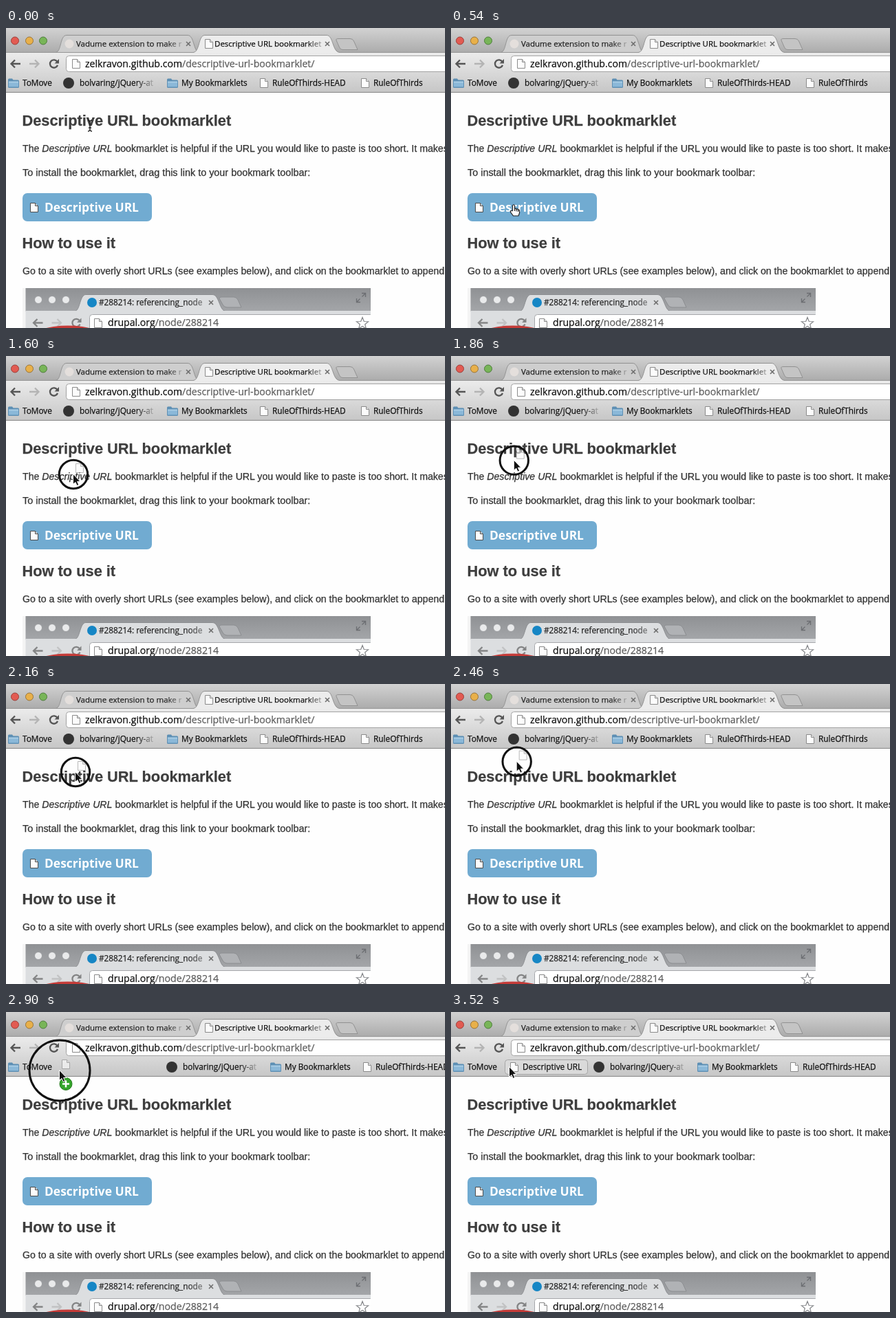
Recreate the animation shown at these times as an HTML page. Size 638 by 436 pixels, loop 5140 ms.

```html
<!DOCTYPE html>
<html lang="en">
<head>
<meta charset="utf-8">
<title>Bookmarklet install</title>
<style>
html, body { margin: 0; width: 100%; height: 100%; overflow: hidden; background: #fefefe; }
svg { display: block; width: 638px; height: 436px; }
text { white-space: pre; fill: var(--ink); stroke: var(--ink); stroke-width: .25px; }
.ui { --ink: #111; font-family: "Open Sans", "Noto Sans", sans-serif; font-size: 11.8px; }
.tab { font-size: 11.5px; }
.url { font-size: 14.1px; }
.path { --ink: #5c5c5c; fill: var(--ink); stroke: var(--ink); }
.page { --ink: #333; font-family: "Liberation Sans", Arial, sans-serif; font-size: 14.4px; }
.long { font-size: 14.15px; }
.head { --ink: #3e3e3e; font-size: 21.8px; font-weight: bold; }
.button { --ink: #fff; font-size: 17.4px; font-weight: bold; stroke: none; }
[href="#sheet"] { stroke: #8b8b8b; }
[href="#sheet"].dark { stroke: #4c4c4c; }
</style>
</head>
<body>
<svg viewBox="0 0 638 436">
  <defs>
    <linearGradient id="strip" x2="0" y2="1"><stop stop-color="#d2d2d2"/><stop offset="1" stop-color="#ababab"/></linearGradient>
    <linearGradient id="tools" x2="0" y2="1"><stop stop-color="#ececec"/><stop offset="1" stop-color="#c6c6c6"/></linearGradient>
    <linearGradient id="shot" x2="0" y2="1"><stop stop-color="#8f9194"/><stop offset="1" stop-color="#a4a6a9"/></linearGradient>
    <linearGradient id="fadeTab" gradientUnits="userSpaceOnUse" x1="232" x2="260"><stop stop-color="#222"/><stop offset="1" stop-color="#222" stop-opacity="0"/></linearGradient>
    <linearGradient id="fadeActive" gradientUnits="userSpaceOnUse" x1="436" x2="466"><stop stop-color="#111"/><stop offset="1" stop-color="#111" stop-opacity="0"/></linearGradient>
    <linearGradient id="fadeMark" gradientUnits="userSpaceOnUse" x1="186" x2="219"><stop stop-color="#111"/><stop offset="1" stop-color="#111" stop-opacity="0"/></linearGradient>
    <linearGradient id="fadeShot" gradientUnits="userSpaceOnUse" x1="262" x2="290"><stop stop-color="#222"/><stop offset="1" stop-color="#222" stop-opacity=".35"/></linearGradient>
    <g id="sheet"><path fill="#fcfcfc" d="M.5.5H7.5L11.5 4.5V13.5H.5Z"/><path fill="#e4e4e4" d="M7.5.5V4.5H11.5"/></g>
    <g id="folder"><path fill="#5d8fb4" d="M0 2Q0 .5 1.5 .5H6L7.5 2.5H14.5Q16 2.5 16 4V12.5Q16 14 14.5 14H1.5Q0 14 0 12.5Z"/><path fill="#8bb8d8" d="M1 5H15V12.5H1Z"/><path fill="#a9cde5" d="M1 4.5H15V6.5H1Z"/></g>
    <g id="close" fill="none" stroke="#6d6d6d" stroke-width="1.6"><path d="M-3-3L3 3M3-3L-3 3"/></g>
    <g id="nav" fill="none" stroke-width="2.3">
      <path stroke="#555" d="M21 52H8M13 46.5L7.5 52L13 57.5"/>
      <path stroke="#b4b4b4" d="M34 52H47M42 46.5L47.5 52L42 57.5"/>
      <path stroke="#555" d="M74.5 49A5.7 5.7 0 1 0 75 54"/>
      <path fill="#555" d="M77 45V51.5H70.5Z"/>
    </g>
  </defs>

  <rect width="638" height="436" fill="#fefefe"/>

  <g class="page">
    <text class="head" x="23.500" y="142">Descriptive URL bookmarklet</text>
    <text class="long" x="24" y="180">The <tspan font-style="italic">Descriptive URL</tspan> bookmarklet is helpful if the URL you would like to paste is too short. It makes</text>
    <text x="24" y="215">To install the bookmarklet, drag this link to your bookmark toolbar:</text>
    <text class="head" x="23.500" y="320">How to use it</text>
    <text class="long" x="24" y="358">Go to a site with overly short URLs (see examples below), and click on the bookmarklet to append</text>
  </g>
  <rect x="24" y="240" width="188" height="41" rx="7" fill="#71abd1"/>
  <use href="#sheet" class="dark" x="35" y="254"/>
  <text class="ui button" x="56" y="267">Descriptive URL</text>

  <g>
    <rect x="24" y="378" width="5" height="58" fill="#f4f4f4"/>
    <rect x="28.500" y="378" width="501.500" height="34" fill="url(#shot)"/>
    <g fill="#e9eaeb" stroke="#999b9e"><circle cx="47" cy="395" r="5.500"/><circle cx="67" cy="395" r="5.500"/><circle cx="87" cy="395" r="5.500"/></g>
    <path fill="#dcdee0" stroke="#8b8d90" d="M100 411.500C108 411 107 387.500 116 387.500H300C310 387.500 310 411 319 411.500"/>
    <path fill="#b0b2b5" stroke="#8b8d90" d="M310 393Q310 391 313 391H331Q335 391 337 395L342 406H321Q317 406 315 402Z"/>
    <rect x="28.500" y="411" width="501.500" height="25" fill="#dcdee0"/>
    <rect x="121.500" y="416.500" width="412" height="26" rx="4" fill="#fff" stroke="#a5a7aa"/>
    <rect x="530" y="378" width="108" height="58" fill="#fefefe"/>
    <g opacity=".65"><use href="#nav" x="32.500" y="376.500"/></g>
    <circle cx="125" cy="399" r="7" fill="#1686c5"/>
    <text class="ui" x="135" y="403" style="--ink:url(#fadeShot)">#288214: referencing_node</text>
    <use href="#close" x="298" y="399"/>
    <use href="#sheet" x="128" y="422"/>
    <text class="ui url" x="148" y="433">drupal.org<tspan class="path">/node/288214</tspan></text>
    <path fill="none" stroke="#85878a" stroke-width="1.200" d="M518 420.500L520.300 426.500L526.500 426.700L521.700 430.700L523.400 437L518 433.500L512.600 437L514.300 430.700L509.500 426.700L515.700 426.500Z"/>
    <path fill="none" stroke="#6c6e72" stroke-width="1.400" d="M517 385.500H522.500V391M522.500 385.500L517.500 390.500M509.500 393V398.500H515M509.500 398.500L514.500 393.500"/>
    <ellipse cx="90" cy="452" rx="55" ry="19.500" fill="#c43b38"/>
  </g>

  <rect width="638" height="36" fill="url(#strip)"/>
  <circle cx="13" cy="18.500" r="5.500" fill="#e25b52" stroke="#9c403b"/>
  <circle cx="34" cy="18.500" r="5.500" fill="#e8b04a" stroke="#98743a"/>
  <circle cx="54" cy="18.500" r="5.500" fill="#78b558" stroke="#4f7d3e"/>
  <path fill="#cecece" stroke="#929292" d="M72 35.500C81 35 78 10.500 88 10.500H264C274 10.500 272 35 281 35.500"/>
  <path fill="#c4c4c4" stroke="#929292" d="M480 18Q479 15.500 483 15.500H500Q504 15.500 505.500 19L511 31.500H489Q486 31.500 484.500 28Z"/>
  <rect y="35" width="638" height="59" fill="url(#tools)"/>
  <path stroke="#959595" d="M0 35.500H273M484 35.500H638"/>
  <path fill="#ececec" d="M272 36C282 35 279 10.500 289 10.500H466C476 10.500 474 35 485 36Z"/>
  <path fill="none" stroke="#929292" d="M272 35.500C282 35 279 10.500 289 10.500H466C476 10.500 474 35 485 35.500"/>
  <circle cx="92" cy="23" r="6.500" fill="#e4dfdc"/>
  <text class="ui tab" x="102" y="27" style="--ink:url(#fadeTab)">Vadume extension to make r</text>
  <use href="#close" x="265" y="23"/>
  <use href="#sheet" x="289" y="16"/>
  <text class="ui tab" x="303" y="27" style="--ink:url(#fadeActive)">Descriptive URL bookmarklet</text>
  <use href="#close" x="467" y="23"/>
  <use href="#nav"/>
  <rect x="87.500" y="40.500" width="570" height="23" rx="4" fill="#fff" stroke="#a2a2a2"/>
  <use href="#sheet" x="96" y="45"/>
  <text class="ui url" x="115" y="57">zelkravon.github.com</text>
  <text class="ui url path" x="256" y="57">/descriptive-url-bookmarklet/</text>

  <path stroke="#858585" d="M0 93.500H638"/>
  <use href="#folder" x="3" y="73"/>
  <text class="ui" x="24" y="84.300">ToMove</text>
  <g id="added">
    <rect x="78.500" y="69.500" width="120" height="21" rx="4" fill="#dadada" stroke="#a6a6a6"/>
    <use href="#sheet" x="86" y="73"/>
    <text class="ui" x="104" y="84.300">Descriptive URL</text>
  </g>
  <g id="shifted" class="ui">
    <circle cx="91" cy="80" r="8" fill="#333"/>
    <text x="107" y="84.300" style="--ink:url(#fadeMark)">bolvaring/jQuery-at</text>
    <use href="#folder" x="234" y="73"/>
    <text x="255" y="84.300">My Bookmarklets</text>
    <use href="#sheet" x="369" y="73"/>
    <text x="387" y="84.300">RuleOfThirds-HEAD</text>
    <use href="#sheet" x="516" y="73"/>
    <text x="534" y="84.300">RuleOfThirds</text>
  </g>

  <g id="pointer">
    <use id="ghost" href="#sheet" x="3" y="-16" opacity=".6"/>
    <circle id="ring" fill="none" stroke="#111" stroke-width="3"/>
    <g id="plus">
      <circle cx="9" cy="19.500" r="9" fill="#35a52c" stroke="#237a1c"/>
      <path stroke="#fff" stroke-width="2.500" d="M9 14.500V24.500M4 19.500H14"/>
    </g>
    <path id="arrow" fill="#111" stroke="#fff" d="M-.5-.5V14.500L3 11.500L5.200 16.500L7.800 15.300L5.600 10.500H10Z"/>
    <path id="beam" fill="none" stroke="#222" stroke-width="1.300" d="M-3-8Q0-8 0-5Q0-8 3-8M0-5V5M-3 8Q0 8 0 5Q0 8 3 8M-2 3H2"/>
    <path id="hand" fill="#fff" stroke="#222" stroke-width="1.200" d="M-1.500 9V1Q0-1.500 1.500 1V6Q3 4.500 4 6.500Q5.500 5 6.500 7.200Q8.500 6.500 8.500 9V12L7 16H-.5L-4.500 10.500Q-5 7.500-1.500 9M1.500 6V9M4 6.500V9.500M6.500 7.200V10"/>
  </g>
</svg>
<script>
const LOOP = 5140;
const GAP = 150, ADDED = 124;
const DROP = 3340;

// Each row: time, x, y of the pointer's hot spot.
const path = [
  [0, 122, 142], [20, 122, 142], [140, 92, 180], [260, 53, 225], [350, 38, 252],
  [430, 52, 265], [540, 91, 257], [1080, 91, 257], [1170, 66, 241], [1260, 91, 219],
  [1400, 116, 188], [1510, 105, 167], [1600, 98, 172], [1640, 97, 171], [1800, 88, 158],
  [2000, 105, 137], [2140, 101, 128], [2160, 101, 128], [2290, 100, 131], [2450, 96, 114],
  [2660, 89, 88], [2720, 85, 85], [2880, 78, 85], [3340, 78, 85], [3520, 85, 80]
];
const radius = [[880, 31], [1080, 31], [1180, 20.7], [2590, 20.7], [2660, 36.3], [2700, 44]];
const shift = [[2640, 0], [2660, 10], [2750, 90], [2840, GAP], [DROP, GAP], [3420, ADDED]];

const $ = id => document.getElementById(id);
const show = (id, on) => $(id).setAttribute('display', on ? 'inline' : 'none');

// Slope at key i, flat wherever the value turns or rests.
function slope(keys, i, k) {
  if (i < 1 || i > keys.length - 2) return 0;
  const [a, b, c] = [keys[i - 1], keys[i], keys[i + 1]];
  const before = (b[k] - a[k]) / (b[0] - a[0]), after = (c[k] - b[k]) / (c[0] - b[0]);
  return before * after <= 0 ? 0 : 2 * before * after / (before + after);
}

function sample(keys, t, k = 1) {
  const next = keys.findIndex(key => key[0] > t);
  if (next === 0) return keys[0][k];
  if (next < 0) return keys[keys.length - 1][k];
  const a = keys[next - 1], b = keys[next];
  const span = b[0] - a[0], u = (t - a[0]) / span, v = 1 - u;
  return a[k] * (1 + 2 * u) * v * v + b[k] * u * u * (3 - 2 * u)
    + span * u * v * (slope(keys, next - 1, k) * v - slope(keys, next, k) * u);
}

function cursorAt(t, y) {
  if (t >= 1080) return 'arrow';
  if (y > 240) return 'hand';
  const overText = [[122, 147], [166, 185], [201, 220]].some(([top, end]) => y >= top && y <= end);
  return overText ? 'beam' : 'arrow';
}

function render(t) {
  const x = sample(path, t), y = sample(path, t, 2);
  $('pointer').setAttribute('transform', `translate(${x} ${y})`);
  const cursor = cursorAt(t, y);
  for (const id of ['arrow', 'beam', 'hand']) show(id, id === cursor);

  show('ring', t >= 880 && t < 3520);
  $('ring').setAttribute('r', sample(radius, t));
  $('ring').setAttribute('opacity', t < DROP ? 1 : Math.max(0, 1 - (t - DROP) / 180));

  show('ghost', t >= 1300 && t < DROP);
  show('plus', t >= 2600 && t < DROP);
  show('added', t >= DROP + 20);
  $('shifted').setAttribute('transform', `translate(${sample(shift, t)} 0)`);
}

const start = performance.now();
function tick() {
  render((performance.now() - start) % LOOP);
  requestAnimationFrame(tick);
}
tick();
</script>
</body>
</html>
```
